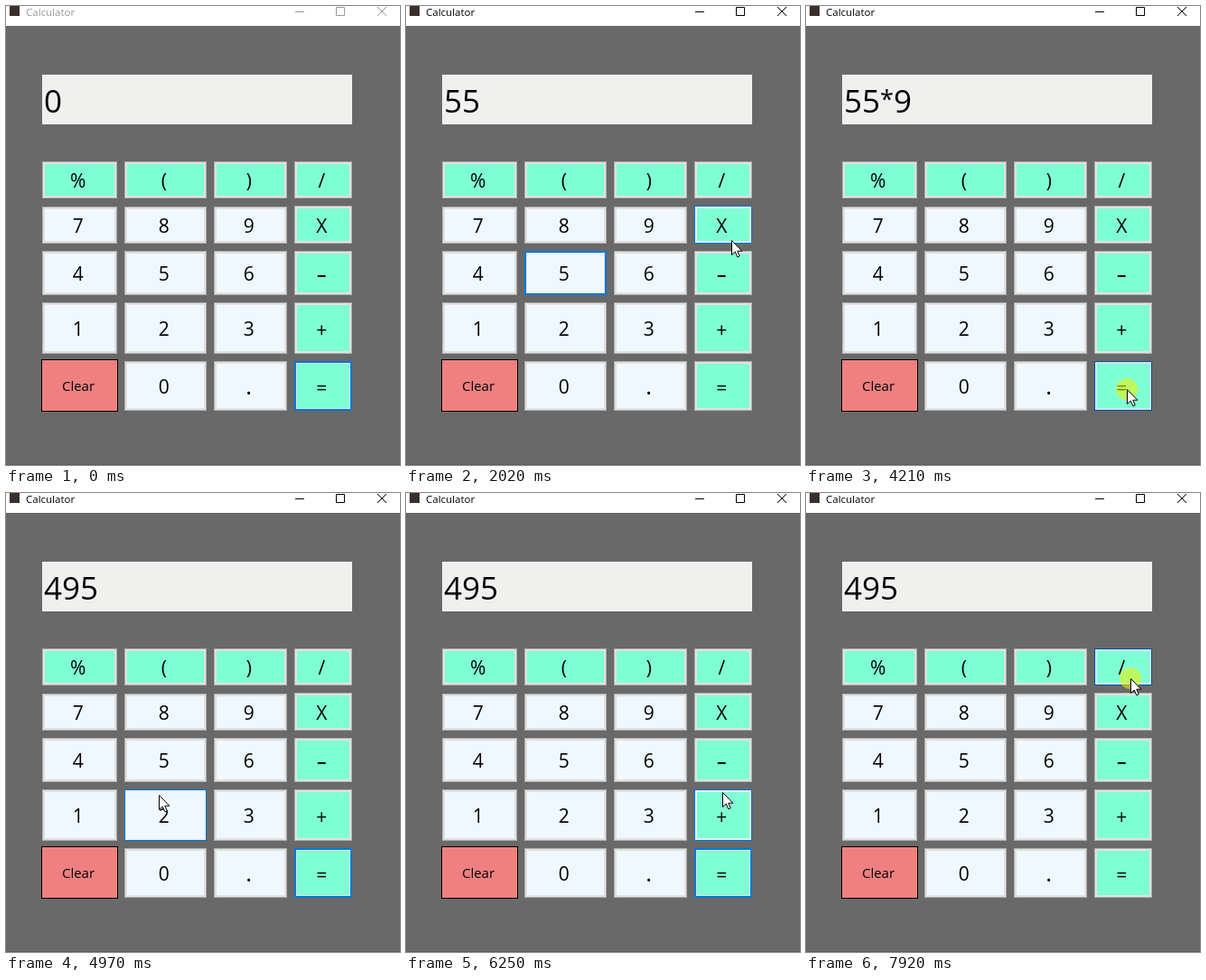
These frames come from a looping animation (436 px wide and 508 px high, 7990 ms). An HTML page:

```html
<!DOCTYPE html>
<html lang="en">
<head>
<meta charset="utf-8">
<title>Calculator</title>
<style>
  html, body { margin: 0; width: 100%; height: 100%; overflow: hidden; background: #696969; }
  svg { display: block; width: 436px; height: 508px; font-family: "Open Sans", "Noto Sans", sans-serif; }
</style>
</head>
<body>
<svg id="stage" viewBox="0 0 436 508"></svg>
<script>
const LOOP = 7990, ENTER = 130;
const stage = document.getElementById('stage');

// left and right of each column, top and bottom of each row
const cols = [[40, 123], [131, 222], [230, 311], [319, 383]];
const rows = [[172, 213], [222, 263], [271, 320], [328, 385], [393, 448]];
const keys = ['%()/', '789X', '456–', '123+', ' 0.='].flatMap((line, r) =>
  [...line].map((label, c) => {
    const [x, right] = cols[c], [top, bottom] = rows[r];
    const y = top - (label === 'X');
    return { label, x, y, right, bottom, fill: r === 0 || c === 3 ? '#7fffd4' : '#f0f8ff' };
  })).filter(k => k.label !== ' ');

// pointer moves: departure, arrival, x, y
const moves = [
  [0, ENTER, 347, 482], [ENTER, 410, 165, 292], [1500, 2020, 360, 259], [2300, 2490, 270, 248],
  [2960, 3300, 348, 306], [3300, 3940, 355, 424], [4400, 4970, 169, 334], [4970, 5150, 126, 345],
  [5150, 5740, 300, 305], [5740, 5950, 350, 250], [5950, 6450, 350, 385], [6720, 6910, 355, 427],
  [7000, 7530, 358, 217], [7670, 7780, 359, 205]
];

// clicks: press, release, key, display afterwards
const clicks = [
  [-1, 0, '=', '0'], [880, 1020, '5', '5'], [1350, 1480, '5', '55'], [2150, 2290, 'X', '55*'],
  [2750, 2820, '9', '55*9'], [4140, 4270, '=', '495'], [7850, LOOP, '/', '495']
];

const rect = (x, y, w, h, fill, extra = '') =>
  `<rect x="${x}" y="${y}" width="${w}" height="${h}" fill="${fill}" ${extra}/>`;
const text = (x, y, size, s, extra = '') =>
  `<text x="${x}" y="${y}" font-size="${size}" ${extra}>${s}</text>`;

function pointerAt(t) {
  const i = moves.findLastIndex(m => m[0] <= t);
  const [from, to, x, y] = moves[i], [, , x0, y0] = moves[Math.max(0, i - 1)];
  const k = Math.min(1, (t - from) / (to - from));
  return { x: Math.round(x0 + (x - x0) * k), y: Math.round(y0 + (y - y0) * k) };
}

function titleBar(active) {
  const ink = active ? '#000' : '#999';
  return rect(0, 0, 436, 22, '#fff') + rect(4, 0, 11, 11, '#3a2e2b') +
    text(22, 11, 11.5, 'Calculator', `fill="${ink}"`) +
    `<path d="M320 6.5h10M365.5 1.5h9v9h-9zM411 1l10 10M421 1l-10 10" fill="none" stroke="${ink}"/>`;
}

function display(value) {
  const star = '<tspan font-size="27" dy="-5">*</tspan><tspan dy="5">\u200b</tspan>';
  return rect(40, 76, 343, 55, '#f0f0ee') + text(42, 117.5, 35, value.replace('*', star));
}

function button(k, state, active) {
  const [edge, inner, line] = {
    normal: ['#adadad', '#e1e1e1', 1],
    focus: ['#0078d7', '#e1e1e1', 2],
    hover: [active ? '#0078d7' : '#8796a3', '#e5f1fb', 1],
    down: ['#005499', '#cce4f7', 1]
  }[state];
  const w = k.right - k.x, h = k.bottom - k.y;
  const box = (d, fill) => rect(k.x + d, k.y + d, w - 2 * d, h - 2 * d, fill);
  const drop = '+–=.'.includes(k.label) ? 9.5 : 8;
  const weight = '–.'.includes(k.label) ? 600 : 400;
  return box(0, edge) + box(line, inner) + box(3, k.fill) +
    text(k.x + w / 2 - 1.75, rows.find(r => r[1] === k.bottom)[0] / 2 + k.bottom / 2 + drop, 21, k.label,
      `text-anchor="middle" font-weight="${weight}"`);
}

function pointer({ x, y }, down) {
  const spot = down ? '<circle r="12" fill="#f0f000" opacity=".55"/>' : '';
  return `<g transform="translate(${x} ${y})">${spot}
    <path d="M.5.5V16.5L4.3 13L6.8 18.8L9.2 17.8L6.8 12.2H11.8Z" fill="#fff" stroke="#000"/></g>`;
}

function draw(t) {
  const [, release, focused] = clicks.findLast(c => c[0] <= t);
  const value = clicks.findLast(c => c[1] <= t)[3];
  const active = t >= clicks[1][0];
  const down = t < release;
  const p = pointerAt(t), visible = t >= ENTER;
  const stateOf = k => {
    const over = visible && p.x >= k.x && p.x < k.right && p.y >= k.y && p.y < k.bottom;
    return over ? (down ? 'down' : 'hover') : k.label === focused ? 'focus' : 'normal';
  };
  stage.innerHTML = rect(0, 0, 436, 508, '#696969') + rect(0, 507, 436, 1, '#5f5a5c') +
    titleBar(active) + display(value) +
    keys.map(k => button(k, stateOf(k), active)).join('') +
    rect(39.5, 391.5, 84, 57, '#f08080', 'stroke="#000"') +
    text(80, 426, 15, 'Clear', 'text-anchor="middle"') +
    (visible ? pointer(p, down) : '');
}

const start = performance.now();
function tick() {
  draw((performance.now() - start) % LOOP);
  requestAnimationFrame(tick);
}
tick();
</script>
</body>
</html>
```
